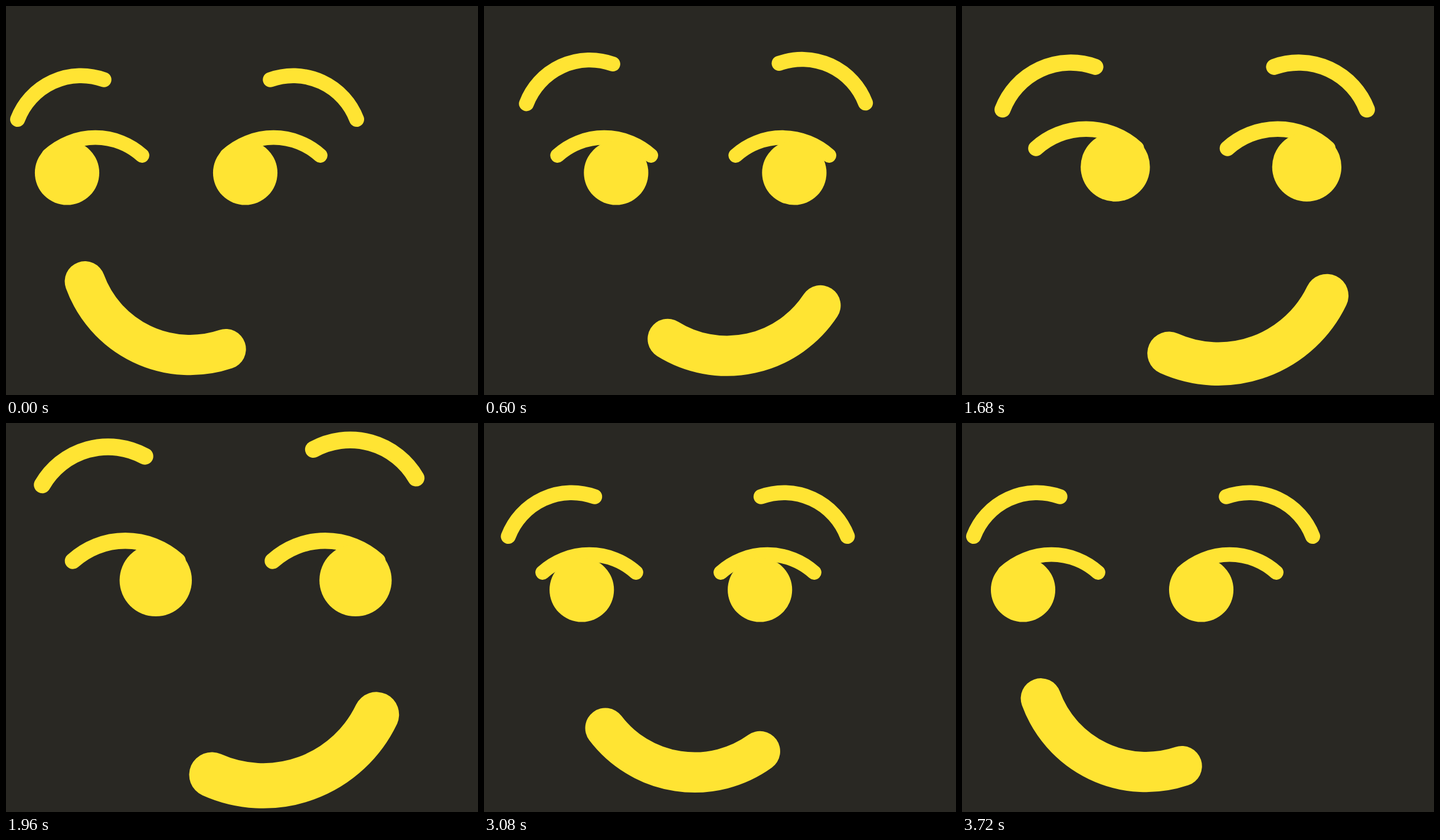
Recreate the animation shown at these times as an HTML page. Size 800x660 px, loop 3.92 s.

```html
<!DOCTYPE html>
<html lang="en">
<head>
<meta charset="utf-8">
<title>Glancing face</title>
<style>
  html, body { margin: 0; width: 100%; height: 100%; overflow: hidden; background: #292823; }
  svg { display: block; width: 100vw; height: 100vh; }
  path { fill: none; stroke: #ffe433; stroke-linecap: round; }
  circle { fill: #ffe433; }
</style>
</head>
<body>
<svg viewBox="0 0 800 660">
  <g id="face">
    <path id="browLeft" d="M19.7 192.3A115 115 0 0 1 166 125" stroke-width="25.4"/>
    <path id="browRight" d="M594.3 192.3A115 115 0 0 0 448 125" stroke-width="25.4"/>
    <g id="lids" stroke-width="24.6">
      <path d="M72.4 253.6A118 118 0 0 1 230.6 253.6"/>
      <path d="M374.4 253.6A118 118 0 0 1 532.6 253.6"/>
    </g>
    <g id="pupils">
      <circle cx="103.5" cy="283" r="54.6"/>
      <circle cx="405.5" cy="283" r="54.6"/>
    </g>
    <path id="mouth" stroke-width="68.4"/>
  </g>
</svg>
<script>
const LOOP = 3920, STEP = 40, GLANCE = 960;
const el = id => document.getElementById(id);
const place = (id, transform) => el(id).setAttribute('transform', transform);

// Cubic ease-out from 0 to 1
function ease(t, start, duration) {
  const x = Math.min(1, Math.max(0, (t - start) / duration));
  return 1 - (1 - x) ** 3;
}

// Rises until `turn`, then settles back to 0
const pulse = (t, start, duration, turn) =>
  ease(Math.min(t, turn), start, duration) * (1 - ease(t, turn, 400));

// 0 looks left, 1 looks right
const glance = (t, go, back) => ease(t, go, GLANCE) - ease(t, back, GLANCE);

function mouthPath(p) {
  const r = 189.7, cx = 312 + 120 * p, cy = 402.4 + 1.8 * p;
  const middle = -25.7 + 45.8 * p;
  const point = degrees => {
    const a = degrees * Math.PI / 180;
    return `${cx + r * Math.sin(a)} ${cy + r * Math.cos(a)}`;
  };
  return `M${point(middle - 44.3)}A${r} ${r} 0 0 0 ${point(middle + 44.3)}`;
}

function draw(t) {
  const brows = glance(t, 264, 2762);
  const eyes = glance(t, 264, 2812);
  const mouth = glance(t, 170, 2812);
  const zoom = 1 + 0.136 * pulse(t, 1456, GLANCE, 2044);
  const hop = pulse(t, 530, 240, 705);
  const lift = pulse(t, 1762, 384, 2044);

  place('face', `translate(399 416) scale(${zoom}) translate(-399 -416)`);
  place('browLeft', `translate(${72 * brows + 12.1 * lift} ${-41.3 * hop - 47 * lift}) rotate(${10.3 * lift} 92.85 158.65)`);
  place('browRight', `translate(${72 * brows - 8.7 * lift} ${-43 * hop - 58.7 * lift}) rotate(${-10.3 * lift} 521.15 158.65)`);
  place('lids', `translate(${72 * eyes})`);
  place('pupils', `translate(${166 * eyes})`);
  el('mouth').setAttribute('d', mouthPath(mouth));
}

const began = performance.now();
function tick() {
  const t = (performance.now() - began) % LOOP;
  draw(Math.floor(t / STEP) * STEP);
  requestAnimationFrame(tick);
}
tick();
</script>
</body>
</html>
```
